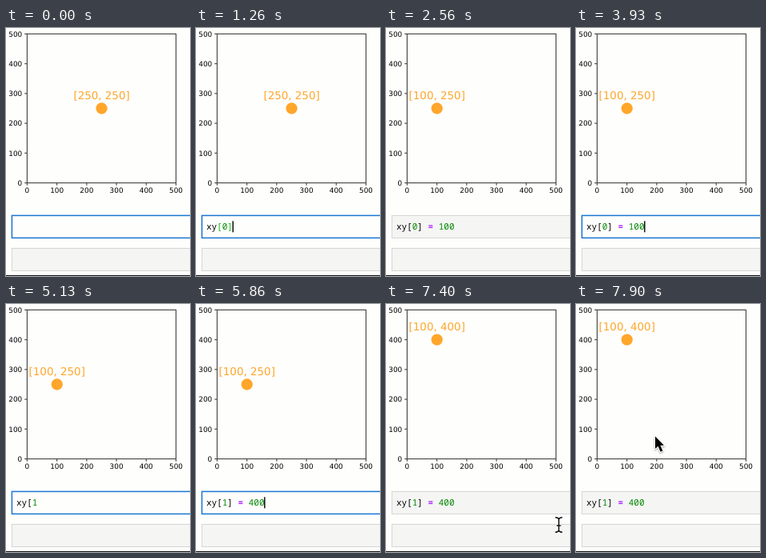
An HTML page with a canvas for the animation above (8000 ms loop, 230 px wide and 310 px high).

```html
<!DOCTYPE html>
<html lang="en">
<head>
<meta charset="utf-8">
<title>Live plot</title>
<style>
html, body { margin: 0; width: 100%; height: 100%; overflow: hidden; background: #fefefd; }
canvas { display: block; width: 230px; height: 310px; }
</style>
</head>
<body>
<canvas id="stage"></canvas>
<script>
const W = 230, H = 310, LOOP = 8000;
const canvas = document.getElementById('stage');
const ctx = canvas.getContext('2d');
const ratio = window.devicePixelRatio || 1;
canvas.width = W * ratio;
canvas.height = H * ratio;
ctx.textRendering = 'geometricPrecision';

const PLOT = { left: 26.4, right: 212.5, top: 7.4, bottom: 193.6 };
const PAPER = '#fefefd', ORANGE = '#ffa62b';
const CODE_X = 12.9, CODE_Y = 252, CHAR = 6.6;
const SANS = '"DejaVu Sans", sans-serif';
const MONO = '11px "Noto Sans Mono", monospace';

const px = v => PLOT.left + (PLOT.right - PLOT.left) * v / 500;
const py = v => PLOT.bottom - (PLOT.bottom - PLOT.top) * v / 500;

// Each event: time and the parts of the state that change.
const events = [
  [0, { text: '', caret: false, active: true, x: 250, y: 250 }],
  [30, { caret: true }],
  [300, { caret: false }]
];
const add = (t, change) => events.push([t, change]);
const type = (start, chars, times) => times.forEach((t, i) =>
  add(t, { text: start + chars.slice(0, i + 1), caret: true }));

type('', 'xy[0] = 100', [500, 600, 830, 1000, 1260, 1360, 1500, 1530, 1830, 1930, 2000]);
add(2260, { caret: false });
add(2430, { active: false });
add(2560, { x: 100 });
add(3930, { active: true, caret: true });
add(4200, { caret: false });
for (let i = 0; i < 8; i++) {
  add(4270 + 67 * i, { text: 'xy[0] = 100'.slice(0, 10 - i), caret: true });
}
type('xy[', '1', [4860]);
add(5130, { caret: false });
type('xy[1', '] = 400', [5200, 5300, 5460, 5500, 5700, 5800, 5860]);
add(6160, { caret: false });
add(6230, { active: false });
add(6260, { y: 400 });

function stateAt(t) {
  const state = {};
  for (const [time, change] of events) {
    if (time <= t) Object.assign(state, change);
  }
  return state;
}

function line(x1, y1, x2, y2) {
  ctx.beginPath();
  ctx.moveTo(x1, y1);
  ctx.lineTo(x2, y2);
  ctx.stroke();
}

function label(text, x, y, align) {
  ctx.textAlign = align;
  ctx.fillText(text, x, y);
}

function drawPlot(x, y) {
  ctx.strokeStyle = '#484848';
  ctx.fillStyle = '#000';
  ctx.lineWidth = 1.15;
  ctx.strokeRect(PLOT.left, PLOT.top, PLOT.right - PLOT.left, PLOT.bottom - PLOT.top);
  ctx.font = '8.9px ' + SANS;
  for (let v = 0; v <= 500; v += 100) {
    line(px(v), PLOT.bottom, px(v), PLOT.bottom + 3.2);
    line(PLOT.left - 3.2, py(v), PLOT.left, py(v));
    label(v, px(v), 206.2, 'center');
    label(v, 20.2, py(v) + 3.2, 'right');
  }
  ctx.fillStyle = ORANGE;
  ctx.beginPath();
  ctx.arc(px(x) + 0.1, py(y), 7.15, 0, Math.PI * 2);
  ctx.fill();
  ctx.font = '13.45px ' + SANS;
  label(`[${x}, ${y}]`, px(x) + 0.1, py(y) - 11.4, 'center');
}

function drawCell(y, active) {
  ctx.fillStyle = active ? PAPER : '#f5f5f4';
  ctx.strokeStyle = active ? '#1976d2' : '#d4d4d4';
  ctx.lineWidth = active ? 1.5 : 1;
  ctx.fillRect(7.4, y, W, 28);
  ctx.strokeRect(7.4, y, W, 28);
}

function charColor(text, i, active) {
  const c = text[i];
  if (c >= '0' && c <= '9') return '#080';
  if (c === '=') return '#a2f';
  // Bracket matching next to the caret
  if (active && text.endsWith(']') && (c === '[' || c === ']')) return '#0b0';
  if (active && text.endsWith('[') && c === '[') return '#a22';
  return '#000';
}

function drawCode({ text, caret, active }) {
  ctx.textAlign = 'left';
  for (let i = 0; i < text.length; i++) {
    ctx.font = (text[i] === '=' ? 'bold ' : '500 ') + MONO;
    ctx.fillStyle = charColor(text, i, active);
    ctx.fillText(text[i], CODE_X + i * CHAR, CODE_Y);
  }
  if (caret && active) {
    ctx.fillStyle = '#000';
    ctx.fillRect(CODE_X - 0.4 + text.length * CHAR, 241.3, 1.4, 14);
  }
}

function drawBeam(x, y) {
  const path = new Path2D(
    'M-4.4 -9.3 Q-0.8 -9.3 0 -7 Q0.8 -9.3 4.4 -9.3 M0 -7 V7 ' +
    'M-4.4 9.3 Q-0.8 9.3 0 7 Q0.8 9.3 4.4 9.3 M-2.6 1 H2.6');
  ctx.save();
  ctx.translate(x, y);
  ctx.strokeStyle = '#fff';
  ctx.lineWidth = 3;
  ctx.stroke(path);
  ctx.strokeStyle = '#111';
  ctx.lineWidth = 1.5;
  ctx.stroke(path);
  ctx.restore();
}

function drawArrow(x, y) {
  const path = new Path2D('M0 0 V15.6 L3.6 12.3 L6.6 19.2 L9.4 18 L6.4 11.2 H11 Z');
  ctx.save();
  ctx.translate(x, y);
  ctx.lineJoin = 'round';
  ctx.strokeStyle = '#fff';
  ctx.lineWidth = 2.4;
  ctx.shadowColor = 'rgba(0,0,0,0.35)';
  ctx.shadowBlur = 2 * ratio;
  ctx.shadowOffsetY = ratio;
  ctx.stroke(path);
  ctx.shadowColor = 'transparent';
  ctx.fillStyle = '#000';
  ctx.fill(path);
  ctx.restore();
}

function drawPointer(t) {
  if (t >= 7400 && t < 7600) {
    const k = Math.floor((t - 7400) / 33.4) / 5;
    drawBeam(216 - 60 * k, 276 - 38 * k);
  } else if (t >= 7830) {
    const k = t < 7870 ? 0 : t < 7900 ? 0.6 : 1;
    drawArrow(101.7 - 2.7 * k, 202.5 - 37 * k);
  }
}

function draw(t) {
  const state = stateAt(t);
  ctx.setTransform(ratio, 0, 0, ratio, 0, 0);
  ctx.fillStyle = PAPER;
  ctx.fillRect(0, 0, W, H);
  drawPlot(state.x, state.y);
  drawCell(234.4, state.active);
  drawCell(275.4, false);
  drawCode(state);
  ctx.fillStyle = '#111';
  ctx.fillRect(0, 309, W, 1);
  drawPointer(t);
}

const start = performance.now();
function frame() {
  draw((performance.now() - start) % LOOP);
  requestAnimationFrame(frame);
}
frame();
</script>
</body>
</html>
```
